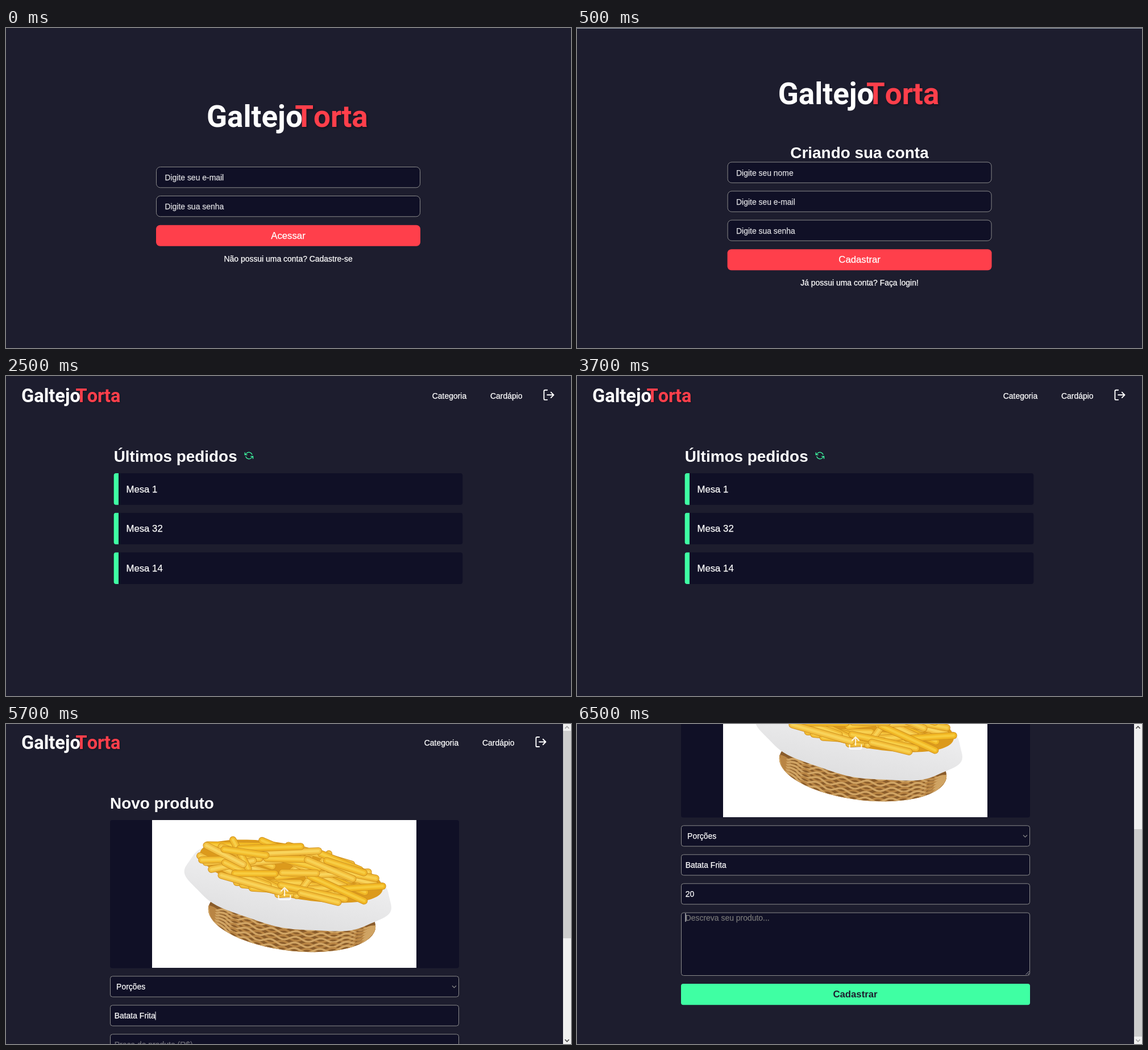
An HTML page with a canvas that plays this animation: 994 by 563 pixels, repeating every 8 s.

```html
<!DOCTYPE html>
<html lang="pt-BR">
<head>
<meta charset="utf-8">
<title>GaltejoTorta</title>
<style>
  html, body { margin: 0; width: 100%; height: 100%; overflow: hidden; background: #1d1d2e; }
  canvas { display: block; }
</style>
</head>
<body>
<canvas id="stage" width="994" height="563"></canvas>
<script>
const ctx = document.getElementById('stage').getContext('2d');
const W = 994, H = 563, LOOP = 8000;
const DARK = '#1d1d2e', INK = '#101026', RED = '#ff3f4b', GREEN = '#3fffa3', GRAY = '#8a8a8a';
const SANS = '"Liberation Sans", Arial, sans-serif';
const SMALL = 13.95, MEDIUM = 16.74, LARGE = 27.9;
const ROW = 51;

const ICONS = {
  logout: 'M9 21H5a2 2 0 0 1-2-2V5a2 2 0 0 1 2-2h4M16 17l5-5-5-5M21 12H9',
  refresh: 'M1 4v6h6M23 20v-6h-6M20.49 9A9 9 0 0 0 5.64 5.64L1 10m22 4l-4.64 4.36A9 9 0 0 1 3.51 15',
  upload: 'M21 15v4a2 2 0 0 1-2 2H5a2 2 0 0 1-2-2v-4M17 8l-5-5-5 5M12 3v12'
};

function rect(x, y, w, h, color) {
  ctx.fillStyle = color;
  ctx.fillRect(x, y, w, h);
}

// A hairline stroke gives regular text the weight of screen rendering.
function text(str, x, y, size, { color = '#fff', bold = false, align = 'left' } = {}) {
  ctx.font = `${bold ? 'bold ' : ''}${size}px ${SANS}`;
  ctx.textAlign = align;
  ctx.fillStyle = ctx.strokeStyle = color;
  ctx.fillText(str, x, y);
  if (bold) return;
  ctx.lineWidth = 0.25;
  ctx.strokeText(str, x, y);
}

function panel(x, y, w, h, r, fill, border) {
  const d = border ? 0.5 : 0;
  ctx.beginPath();
  ctx.roundRect(x + d, y + d, w - 2 * d, h - 2 * d, r);
  ctx.fillStyle = fill;
  ctx.fill();
  if (border) {
    ctx.strokeStyle = border;
    ctx.lineWidth = 1;
    ctx.stroke();
  }
}

function line(points, color, width) {
  ctx.beginPath();
  for (let i = 0; i < points.length; i += 2) ctx.lineTo(points[i], points[i + 1]);
  ctx.strokeStyle = color;
  ctx.lineWidth = width;
  ctx.stroke();
}

function icon(name, cx, cy, scale, color) {
  ctx.save();
  ctx.translate(cx, cy);
  ctx.scale(scale, scale);
  ctx.translate(-12, -12);
  ctx.lineCap = ctx.lineJoin = 'round';
  ctx.lineWidth = 2;
  ctx.strokeStyle = color;
  ctx.stroke(new Path2D(ICONS[name]));
  ctx.restore();
}

function brand(x, y, size) {
  ctx.save();
  ctx.font = `bold ${size}px Roboto, sans-serif`;
  ctx.fontKerning = 'none';
  ctx.textAlign = 'left';
  ctx.fillStyle = '#fff';
  ctx.fillText('Galtejo', x, y);
  ctx.shadowColor = 'rgba(0,0,0,.35)';
  ctx.shadowBlur = size * 0.07;
  ctx.shadowOffsetX = ctx.shadowOffsetY = size * 0.03;
  ctx.fillStyle = RED;
  ctx.fillText('Torta', x + size * 2.93, y);
  ctx.restore();
}

function form(x, y, labels, action) {
  labels.forEach((label, i) => {
    panel(x, y + ROW * i, 465, 37.3, 7, INK, GRAY);
    text(label, x + 15.4, y + ROW * i + 24, SMALL, { color: '#dcdce0' });
  });
  y += ROW * labels.length + 0.7;
  panel(x, y, 465, 37, 7, RED);
  text(action, x + 232.5, y + 24, MEDIUM, { align: 'center' });
}

function login() {
  brand(353, 174, 53);
  form(264, 244, ['Digite seu e-mail', 'Digite sua senha'], 'Acessar');
  text('Não possui uma conta? Cadastre-se', 496.6, 410.5, SMALL, { align: 'center' });
}

function signup() {
  rect(0, 0, W, 1, '#9ba5b3');
  brand(353.7, 134, 53);
  text('Criando sua conta', 497, 229, LARGE, { bold: true, align: 'center' });
  form(264.6, 235.5, ['Digite seu nome', 'Digite seu e-mail', 'Digite sua senha'], 'Cadastrar');
  text('Já possui uma conta? Faça login!', 497, 452.5, SMALL, { align: 'center' });
}

function header(dx, dy) {
  brand(27, 46 + dy, 32.6);
  text('Categoria', 749.7 + dx, 40 + dy, SMALL);
  text('Cardápio', 852 + dx, 40 + dy, SMALL);
  icon('logout', 955 + dx, 33.3 + dy, 0.95, '#fff');
}

function orders() {
  header(0, 0);
  text('Últimos pedidos', 189.7, 150.5, LARGE, { bold: true });
  icon('refresh', 427.4, 140, 0.65, GREEN);
  ['Mesa 1', 'Mesa 32', 'Mesa 14'].forEach((label, i) => {
    const y = 171 + 69.6 * i;
    ctx.save();
    ctx.beginPath();
    ctx.roundRect(189.7, y, 613.6, 55.7, 4);
    ctx.clip();
    rect(189, y, 615, 56, INK);
    rect(189, y, 9, 56, GREEN);
    ctx.restore();
    text(label, 211.5, y + 33.5, MEDIUM);
  });
}

// Runs paint inside the frame of a tilted ellipse, after filling it.
function oval(cx, cy, rx, ry, tilt, fill, wobble, paint) {
  ctx.save();
  ctx.translate(cx, cy);
  ctx.rotate(tilt);
  ctx.beginPath();
  for (let a = 0; a < 2 * Math.PI; a += 0.05) {
    const k = 1 + wobble * Math.sin(9 * a);
    ctx.lineTo(rx * k * Math.cos(a), ry * k * Math.sin(a));
  }
  ctx.fillStyle = fill;
  ctx.fill();
  if (paint) paint(rx, ry);
  ctx.restore();
}

function weave(rx, ry) {
  ctx.clip();
  for (let depth = 6; depth < ry + 6; depth += 10) {
    for (const phase of [0, Math.PI]) {
      const pts = [];
      for (let x = -rx; x <= rx; x += 4) {
        pts.push(x, depth * Math.sqrt(1 - (x / rx) ** 2) + 3.5 * Math.sin(x / 7 + phase));
      }
      line(pts, phase ? '#d0a464' : '#b98544', 3.4);
    }
  }
}

function fries(rx, ry) {
  let seed = 11;
  const rand = (lo, hi) => {
    seed = seed * 16807 % 2147483647;
    return lo + (hi - lo) * seed / 2147483647;
  };
  const inside = (x, y) => {
    const k = Math.max(1, Math.hypot(x / rx, y / ry));
    return [x / k, y / k];
  };
  for (let i = 0; i < 52; i++) {
    const turn = rand(0, 2 * Math.PI), far = Math.sqrt(rand(0, 0.8));
    const x = rx * far * Math.cos(turn), y = ry * far * Math.sin(turn);
    const angle = i % 5 ? rand(-0.35, 0.25) : rand(-1.4, 1);
    const half = rand(30, 58), dx = half * Math.cos(angle), dy = half * Math.sin(angle);
    const fry = [...inside(x - dx, y - dy), ...inside(x + dx, y + dy)];
    const light = rand(54, 62);
    line(fry, '#d1921e', 12.5);
    line(fry, `hsl(43, 88%, ${light}%)`, 10.5);
    line(fry, `hsl(46, 92%, ${light + 6}%)`, 4.5);
  }
}

function photo() {
  rect(257, 169, 465, 260, '#fff');
  ctx.save();
  ctx.lineCap = ctx.lineJoin = 'round';
  oval(503, 341, 148, 58, 0.12, '#8a5c2b', 0, weave);
  const paper = ctx.createLinearGradient(0, -70, 0, 75);
  paper.addColorStop(0, '#f4f4f5');
  paper.addColorStop(1, '#dfdfe0');
  oval(497, 285, 184, 73, 0.19, paper, 0.015);
  oval(502, 259, 164, 46, 0.2, '#dc9a1c', 0, fries);
  ctx.restore();
}

function control(y, label, color = '#fff', x = 190.7) {
  panel(183, y, 614, 37.3, 4, INK, GRAY);
  text(label, x, y + 24, SMALL, { color });
}

function scrollbar(scrolled) {
  const arrow = (y, dir, on) =>
    line([983.5, y + 1.8 * dir, 987, y - 1.8 * dir, 990.5, y + 1.8 * dir], on ? '#505050' : '#a8a8a8', 1.8);
  rect(980, 0, 14, H, '#f0f0f0');
  rect(980, scrolled ? 185 : 12, 14, 365, '#cdcdcd');
  arrow(6, 1, scrolled);
  arrow(557, -1, !scrolled);
}

function product(scrolled) {
  ctx.save();
  ctx.translate(0, scrolled ? -265 : 0);
  header(-14, -1.8);
  text('Novo produto', 183, 149, LARGE, { bold: true });
  panel(183, 169, 614, 260.4, 4, INK);
  photo();
  icon('upload', 490, 298.5, 1.16, 'rgba(255,255,255,.8)');

  control(443.3, 'Porções', '#fff', 194.1);
  line([785, 460.5, 788.5, 464, 792, 460.5], GRAY, 1.2);
  control(443.3 + ROW, 'Batata Frita');
  if (scrolled) control(443.3 + 2 * ROW, '20');
  else control(443.3 + 2 * ROW, 'Preço do produto (R$)', '#6c6c74');

  panel(183, 596.6, 614, 111.4, 4, INK, GRAY);
  text('Descreva seu produto...', 190.7, 610.8, SMALL, { color: '#757575' });
  for (const d of [6, 2.5]) line([795.5 - d, 706, 795.5, 706 - d], '#b0b0b0', 1);
  panel(183, 722, 614, 37.3, 4, GREEN);
  text('Cadastrar', 489.5, 746.2, MEDIUM, { color: DARK, bold: true, align: 'center' });

  if (scrolled) rect(190.5, 598, 1, 15, '#fff');
  else rect(262.5, 506, 1, 15, '#fff');
  ctx.restore();
  scrollbar(scrolled);
}

const SCENES = [
  [6500, () => product(true)],
  [4500, () => product(false)],
  [2500, orders],
  [500, signup],
  [0, login]
];

function tick() {
  const t = performance.now() % LOOP;
  rect(0, 0, W, H, DARK);
  SCENES.find(([start]) => t >= start)[1]();
  requestAnimationFrame(tick);
}
tick();
</script>
</body>
</html>
```
